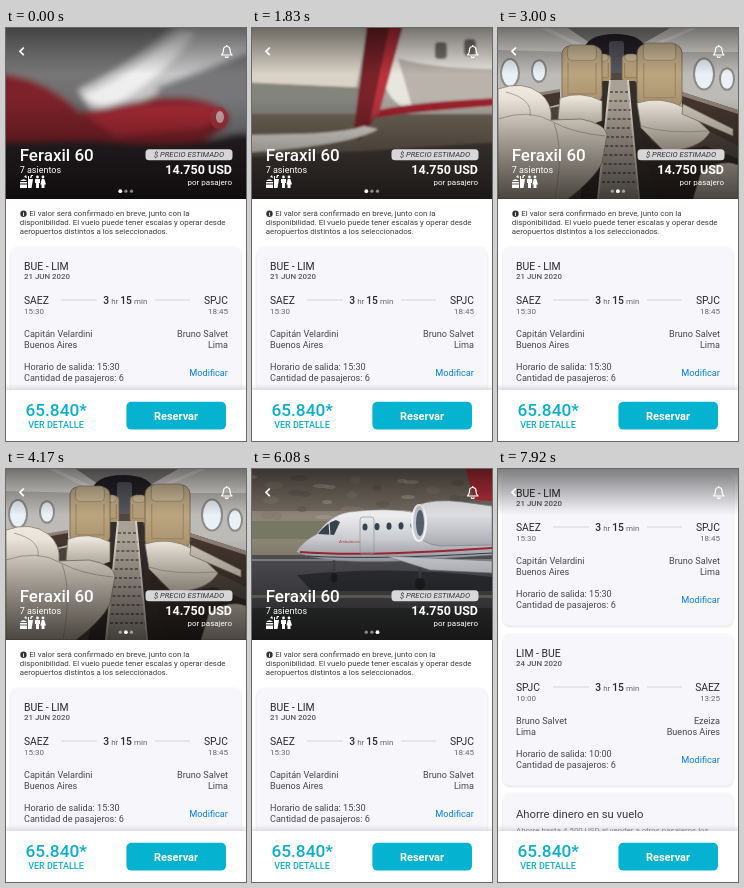
Recreate the animation shown at these times as an HTML page. Size 240 by 413 pixels, loop 8000 ms.

```html
<!DOCTYPE html>
<html lang="es">
<head>
<meta charset="utf-8">
<title>Reserva de vuelo</title>
<style>
html, body { margin: 0; width: 100%; height: 100%; overflow: hidden; background: #fff }
svg { display: block; width: 100%; height: 100% }
text { font-family: Roboto, Arial, sans-serif; white-space: pre }
</style>
</head>
<body>
<svg id="stage" viewBox="0 0 240 413"></svg>
<script>
const stage = document.getElementById('stage');
const LOOP = 8000;

const path = (fill, d, more = '') => `<path fill="${fill}" d="${d}" ${more}/>`;
const line = (color, w, d, more = '') =>
  `<path fill="none" stroke="${color}" stroke-width="${w}" d="${d}" ${more}/>`;
const rect = (x, y, w, h, fill, r = 0, more = '') =>
  `<rect x="${x}" y="${y}" width="${w}" height="${h}" rx="${r}" fill="${fill}" ${more}/>`;
const oval = (x, y, rx, ry, fill, more = '') =>
  `<ellipse cx="${x}" cy="${y}" rx="${rx}" ry="${ry}" fill="${fill}" ${more}/>`;
const text = (x, y, size, fill, str, more = '') =>
  `<text x="${x}" y="${y}" font-size="${size}" fill="${fill}" ${more}>${str}</text>`;
const repeat = (n, draw) => Array.from({ length: n }, (_, i) => draw(i)).join('');
const END = 'text-anchor="end"', MID = 'text-anchor="middle"';
const MEDIUM = 'font-weight="500"', BOLD = 'font-weight="700"';

const gradient = (id, from, a, to, b) =>
  `<linearGradient id="${id}" x1="0" y1="0" x2="0" y2="1">
    <stop offset="0" stop-color="${from}" stop-opacity="${a}"/>
    <stop offset="1" stop-color="${to}" stop-opacity="${b}"/></linearGradient>`;

const defs = `<defs>
  ${gradient('top', '#000', .5, '#000', 0)}
  ${gradient('bottom', '#000', 0, '#000', .62)}
  ${gradient('lift', '#556', 0, '#556', .16)}
  ${gradient('cream', '#eee9e0', 1, '#c3b8a8', 1)}
  ${gradient('tan', '#cdb892', 1, '#a8916c', 1)}
  ${gradient('hull', '#f4f4f5', 1, '#a9abb2', 1)}
  ${gradient('haze', '#8b8b8b', 1, '#484446', 1)}
  <filter id="soft" x="-20%" width="140%"><feGaussianBlur stdDeviation="1.1"/></filter>
  <filter id="blur" x="-20%" width="140%"><feGaussianBlur stdDeviation="3"/></filter>
  <filter id="shade" x="-10%" y="-10%" width="120%" height="120%">
    <feDropShadow dx="0" dy="1" stdDeviation="1.2" flood-color="#445" flood-opacity=".22"/></filter>
  <clipPath id="frame"><rect width="240" height="171"/></clipPath>
</defs>`;

// The first slide pans along the aircraft in three views.
const engineView = `<g filter="url(#blur)">
  ${rect(-120, -10, 480, 190, 'url(#haze)')}
  ${path('#c5c5c6', 'M72 62 Q130 35 178 -10 H360 V70 L160 62 L92 92Z')}
  ${path('#eeeeef', 'M76 68 Q130 45 174 2 L190 4 Q150 58 98 82Z')}
  ${path('#77777a', 'M150 60 L240 25 H360 V150 L180 110Z')}
  ${path('#7e2029', 'M-120 30 L0 46 Q42 52 74 84 L150 70 Q205 65 224 88 Q222 112 160 122 L-120 130Z')}
  ${path('#a52a34', 'M80 88 Q145 72 205 78 Q214 92 198 100 L110 108Z')}
  ${path('#2b2426', 'M-120 116 L90 112 Q180 122 226 106 L360 96 V190 H-120Z')}
  </g>${oval(213, 90, 9, 11, '#a2323d')}${oval(214, 89, 4, 6, '#c9a8ab')}`;

const windowView = `<g filter="url(#soft)">
  ${rect(-120, -10, 480, 190, '#7c1d27')}
  ${path('#d4d3d5', 'M-120 -10 H40 L58 4 V14 L-120 24Z')}
  ${path('#39343a', 'M-120 24 L58 14 V20 L-120 34Z')}
  ${path('#e2e1e3', 'M138 -10 H158 L360 64 V82 L138 8Z')}
  ${path('#2f2a2e', 'M138 8 L360 82 V87 L138 13Z')}
  ${path('#a9a8ac', 'M-120 76 L140 68 L205 65 L360 72 V190 H-120Z')}
  ${path('#e3e2e4', 'M62 78 L140 68 L360 66 V75 L150 78Z')}
  ${path('#6d6a70', 'M110 106 L360 90 V190 H-120 V116Z')}
  ${path('#6d1b24', 'M61 -14 H136 L134 62 Q133 72 123 72 L70 74 Q60 74 60 64Z', 'stroke="#dcdbdd" stroke-width="7"')}
  ${line('#3d262b', 1, 'M65 -10V64Q65 69 71 69L122 67Q129 67 129 61V-10')}
  ${line('#b94852', 1.5, 'M68 69L108 67')}
  ${path('#4a4248', 'M-120 92 L0 92 Q58 104 108 126 L360 124 V190 H-120Z')}
  ${path('#dfdfe2', 'M-120 46 L0 54 Q38 62 70 88 L119 120 L108 128 Q62 104 0 84 L-120 72Z')}
  ${line('#f3f3f4', 4, 'M-120 54L0 62Q36 70 68 96L112 122')}
  </g>`;

const tailView = `<g filter="url(#soft)">
  ${rect(-120, -10, 480, 190, '#aaa69e')}
  ${path('#d9d2c6', 'M-120 -10 H118 L104 60 L-120 48Z')}
  ${path('#83847c', 'M-120 50 L120 60 V92 H-120Z')}
  ${path('#6c6255', 'M-120 86 H360 V190 H-120Z')}
  ${path('#e9e5df', 'M136 -10 H360 V74 L160 82 Q134 76 130 44Z')}
  ${path('#b9b3ab', 'M146 30 Q190 46 360 40 V70 L160 78Z')}
  ${path('#9d222d', 'M128 82 Q180 70 360 66 V73 Q190 78 124 90Z')}
  ${path('#79202a', 'M116 -10 H153 L128 82 L108 112 L101 108Z')}
  ${path('#b9323d', 'M139 -10 H153 L128 82 L118 94Z')}
  ${path('#ded9d2', 'M-120 110 L40 106 Q92 105 112 98 L126 101 Q92 124 -120 130Z')}
  ${path('#46403c', 'M-120 134 Q90 126 360 106 V190 H-120Z')}
  ${rect(183, 14, 12, 17, '#75716d', 4)}${rect(212, 11, 12, 17, '#75716d', 4)}
  </g>`;

// Leather seat back with headrest and stitching.
const seat = (x, y, w, h) =>
  rect(x, y, w, h, 'url(#tan)', w * .2, 'stroke="#75644b" stroke-width=".8"') +
  rect(x + w * .14, y - 1, w * .72, h * .27, '#d2bf9c', 4, 'stroke="#8e7a5b" stroke-width=".6"') +
  line('#8b7657', .7, `M${x + w * .15} ${y + h * .3}V${y + h * .84}H${x + w * .85}V${y + h * .3}`);

const edge = 'stroke="#817667" stroke-width=".8"';
const cabinView =
  rect(0, 0, 240, 171, '#504740') +
  path('#bdbbb8', 'M0 0H240V100L180 80L150 28H85L62 78L0 90Z') +
  path('#e3e1dd', 'M0 0H70L92 14L80 24L0 22ZM240 0H172L146 14L160 24L240 24Z') +
  path('#92908e', 'M70 0H172L146 15H92Z') +
  path('#f7f6f2', 'M42 0H50L88 18L84 20ZM192 0H200L154 20L150 18Z') +
  path('#25232a', 'M85 43V24Q88 6 117 6Q146 6 149 24V43Z') +
  rect(111, 13, 15, 32, '#575760', 3) +
  [[12, 45, 9], [41, 43, 7], [206, 46, 10], [229, 51, 7]].map(([x, y, r]) =>
    oval(x, y, r, r * 1.55, '#e9f0f6', 'stroke="#8c8986" stroke-width="2"')).join('') +
  path('#44362f', 'M0 72L62 62V76L0 92ZM184 64L240 82V118L184 90Z') +
  path('#8c8076', 'M0 71L62 61V64L0 75ZM184 64L240 82V86L184 68Z') +
  seat(95, 27, 18, 27) + seat(124, 27, 18, 27) +
  path('#352f2c', 'M104 53H137L168 171H82Z') +
  path('#aaa196', 'M112 52H130L140 171H100Z') +
  line('#d4ccc1', 2, 'M112 52L100 171M130 52L141 171') +
  repeat(11, i => line('#514b46', 1.5, `M${112 - i * .8} ${64 + i * 9}H${131 + i * .7}`, 'stroke-dasharray="3 2"')) +
  seat(64, 18, 40, 57) + seat(139, 16, 45, 64) +
  path('url(#cream)', 'M62 70Q83 62 104 73V94L80 104L60 91Z', edge) +
  path('#302925', 'M80 101L106 92V106L92 120Z') +
  path('url(#cream)', 'M139 75Q163 67 187 80L212 104Q202 122 166 123L143 100Z', edge) +
  line('#a39685', .8, 'M143 98Q166 106 211 103') +
  path('#352c28', 'M143 104L167 124L208 118L240 131V171H160Z') +
  path('#cfc6b9', 'M185 76L235 101V108L184 86Z', edge) +
  path('url(#cream)', 'M0 61Q25 52 42 65Q55 76 53 92L83 91Q108 96 109 107L104 135Q96 151 70 171H0Z', edge) +
  line('#a69a8c', .9, 'M0 91Q32 80 55 94Q75 105 107 108M56 95Q66 122 57 171M8 64Q35 71 32 88') +
  path('#c4baad', 'M203 144Q224 130 240 137V171H195Z', edge);

const runwayView =
  rect(0, 0, 240, 171, '#8d8378') +
  path('#726a60', 'M0 0H240V42H0Z') +
  repeat(34, i => oval(i * 53 % 240, 8 + i * 17 % 46, 5 + i % 5, 2 + i % 3,
    ['#a39789', '#605c53', '#85796d'][i % 3], 'opacity=".65"')) +
  rect(0, 52, 240, 36, '#777864') + rect(0, 70, 240, 18, '#8c8775') +
  rect(0, 86, 240, 85, '#55555a') +
  line('#8d8d8c', 2, 'M0 91H240') +
  path('#333438', 'M45 106Q140 96 240 108V122H60Z') +
  line('#484a4f', 2.5, 'M82 86V108M168 91V114') +
  oval(82, 109, 3.5, 5, '#222') + oval(168, 115, 5, 6, '#222') +
  path('url(#hull)', 'M44 83Q51 72 65 65Q78 46 97 43Q135 38 166 44L240 46V86L150 92Q72 95 44 83Z', 'stroke="#85868a" stroke-width=".5"') +
  path('#36414c', 'M66 65Q74 54 84 51L88 53L82 66Z') +
  line('#e8e8e8', 1, 'M77 54L78 66') +
  line('#aa2636', 2, 'M48 83Q110 88 240 79') + line('#344454', 1, 'M55 87Q120 91 240 84') +
  rect(108, 48, 14, 37, 'none', 3, 'stroke="#9a9da4" stroke-width=".8"') +
  repeat(5, i => oval(113 + i * 12, 58 - i * .4, 2.5, 3.6, '#334452')) +
  text(87, 74, 4, '#b33b45', 'Ambulancia', 'font-style="italic"') +
  path('#d6d8de', 'M134 87L240 92V104L178 101Z', 'stroke="#85878e" stroke-width=".6"') +
  path('url(#hull)', 'M164 37Q180 29 211 33L240 37V76L188 77Q166 75 161 56Z', 'stroke="#83868c" stroke-width=".7"') +
  oval(167, 54, 7, 18, '#c1c6d0', 'stroke="#f4f4f4" stroke-width="2"') +
  oval(168, 54, 4, 13, '#555d6b') +
  path('#b82f3a', 'M214 0H240V32L222 31Z') +
  rect(0, 126, 240, 3, '#89877a') + rect(0, 139, 240, 32, '#3c3d3e');

const slide = (i, body) =>
  `<g transform="translate(${i * 240} 0)"><g clip-path="url(#frame)">${body}</g></g>`;

const mealIcon = path('#fff', 'M14 153Q17.5 149.5 21 153ZM14 154H21V155.5H14ZM14 156.5H21V160H14ZM22 148H23V151H27L25.5 160H22ZM18 149L20 147L21 150ZM24 150L25 147H27V148H26L25.4 150Z');
const person = (x, d) => oval(x, 149, 1.4, 1.4, '#fff') + path('#fff', d);
const people = person(31.5, 'M29 151H34V155H33V160H30V155H29Z') +
  person(37, 'M35.7 151H38.3L40 156.5H38.5V160H35.5V156.5H34.4Z');

const hero = `<g clip-path="url(#frame)"><g id="slides">
  ${slide(0, `<g id="view0">${engineView}</g><g id="view1">${windowView}</g><g id="view2">${tailView}</g>`)}
  ${slide(1, cabinView)}${slide(2, runwayView)}</g>
  ${rect(0, 70, 240, 101, 'url(#bottom)')}</g>
  ${text(13.7, 132.5, 17, '#fff', 'Feraxil 60', MEDIUM)}
  ${text(13.7, 145, 9, '#fff', '7 asientos')}
  ${mealIcon}${people}
  ${rect(139.5, 121.2, 87, 11, '#e5e5e7', 3.5, 'opacity=".93"')}
  ${text(183, 129.4, 7.7, '#333', '$ PRECIO ESTIMADO', MID + ' font-style="italic"')}
  ${text(226, 145.8, 12.5, '#fff', '14.750 USD', END + ' ' + BOLD)}
  ${text(226, 156.7, 8, '#fff', 'por pasajero', END)}
  ${repeat(3, i => `<circle class="dot" cx="${114.3 + i * 5.6}" cy="163.2" fill="#fff"/>`)}`;

const note = oval(17.5, 185.8, 3.2, 3.2, '#333') +
  text(17.5, 188, 6, '#fff', 'i', MID + ' ' + BOLD) +
  ['El valor será confirmado en breve, junto con la',
   'disponibilidad. El vuelo puede tener escalas y operar desde',
   'aeropuertos distintos a los seleccionados.'].map((s, i) =>
    text(i ? 13.8 : 23.3, 188 + i * 9.2, 7.88, '#3b3b40', s)).join('');

const panel = (y, h) => rect(5, y, 230, h, '#f7f6fb', 7, 'filter="url(#shade)"');

const flight = (y, title, date, from, to, leave, arrive, left, right) => {
  const pair = (dy, size, fill, a, b) =>
    text(18, dy, size, fill, a) + text(222, dy, size, fill, b, END);
  const big = n => `<tspan font-size="10.3" fill="#28282c" ${MEDIUM}>${n}</tspan>`;
  return `<g transform="translate(0 ${y})">${panel(0, 151.5)}
    ${text(18, 22.7, 10.4, '#28282c', title)}
    ${text(18, 32, 7.9, '#55555c', date, MEDIUM)}
    ${pair(56.7, 10.3, '#28282c', from, to)}
    ${pair(66.5, 8, '#66666d', leave, arrive)}
    ${line('#c9c9d0', .8, 'M55 53H91M149 53H184')}
    ${text(97.3, 56.7, 8, '#66666d', `${big(3)} hr ${big(15)} min`)}
    ${pair(90.3, 9.1, '#45454b', left[0], right[0])}
    ${pair(101, 9.1, '#45454b', left[1], right[1])}
    ${text(18, 123.3, 9.1, '#45454b', 'Horario de salida: ' + leave)}
    ${text(18, 134, 9.1, '#45454b', 'Cantidad de pasajeros: 6')}
    ${text(222, 129, 9.2, '#087fe5', 'Modificar', END)}</g>`;
};

const cards =
  flight(219, 'BUE - LIM', '21 JUN 2020', 'SAEZ', 'SPJC', '15:30', '18:45',
    ['Capitán Velardini', 'Buenos Aires'], ['Bruno Salvet', 'Lima']) +
  flight(379, 'LIM - BUE', '24 JUN 2020', 'SPJC', 'SAEZ', '10:00', '13:25',
    ['Bruno Salvet', 'Lima'], ['Ezeiza', 'Buenos Aires']) +
  panel(538, 110) +
  text(18, 562.5, 11.3, '#38383d', 'Ahorre dinero en su vuelo') +
  text(18, 578, 7.9, '#88888e', 'Ahorre hasta 4.500 USD al vender a otros pasajeros los');

const header = rect(0, 0, 240, 46, 'url(#top)') +
  line('#fff', 1.7, 'M17.8 19.5L14 23.3L17.8 27.1') +
  line('#fff', 1.2, 'M215.5 27H226Q224 25 224 22Q224 18.5 220.7 18.5Q217.5 18.5 217.5 22Q217.5 25 215.5 27ZM219 28.5Q220.7 30.5 222.5 28.5M220.7 17V18.5', 'stroke-linejoin="round"');

const footer = rect(0, 356, 240, 6, 'url(#lift)') + rect(0, 362, 240, 51, '#fff') +
  text(50.2, 388, 17.3, '#0bafcb', '65.840*', MID + ' ' + MEDIUM) +
  text(50, 400, 9, '#0bafcb', 'VER DETALLE', MID + ' ' + MEDIUM) +
  rect(120.4, 373.8, 99.6, 27.8, '#05b3d0', 5) +
  text(170, 391.5, 11, '#fff', 'Reservar', MID + ' ' + BOLD);

stage.innerHTML = `${defs}${rect(0, 0, 240, 413, '#fff')}
  <g id="page">${hero}${note}${cards}</g>${header}${footer}`;

const find = id => document.getElementById(id);
const page = find('page'), slides = find('slides');
const views = [0, 1, 2].map(i => find('view' + i));
const dots = [...document.querySelectorAll('.dot')];

const span = (t, a, b) => Math.min(1, Math.max(0, (t - a) / (b - a)));
const smooth = (t, a, b) => { const p = span(t, a, b); return p * p * (3 - 2 * p); };
const glide = (t, a, b) => 1 - (1 - span(t, a, b)) ** 3;
const move = (el, x, y) => el.setAttribute('transform', `translate(${x.toFixed(2)} ${y.toFixed(2)})`);

function render(t) {
  const at = glide(t, 2180, 2720) + glide(t, 4740, 5280);
  move(slides, -240 * at, 0);
  move(page, 0, -214 * smooth(t, 7000, 7860));

  [0, 1080, 1830].forEach((time, i) =>
    move(views[i], Math.max(-60, Math.min(60, (time - t) * .07)), 0));
  views[1].setAttribute('opacity', smooth(t, 400, 800));
  views[2].setAttribute('opacity', smooth(t, 1300, 1650));

  dots.forEach((dot, i) => {
    const on = i === Math.round(at);
    dot.setAttribute('r', on ? 1.9 : 1.6);
    dot.setAttribute('opacity', on ? 1 : .5);
  });
}

const start = performance.now();
function tick() {
  render((performance.now() - start) % LOOP);
  requestAnimationFrame(tick);
}
render(0);
requestAnimationFrame(tick);
</script>
</body>
</html>
```
